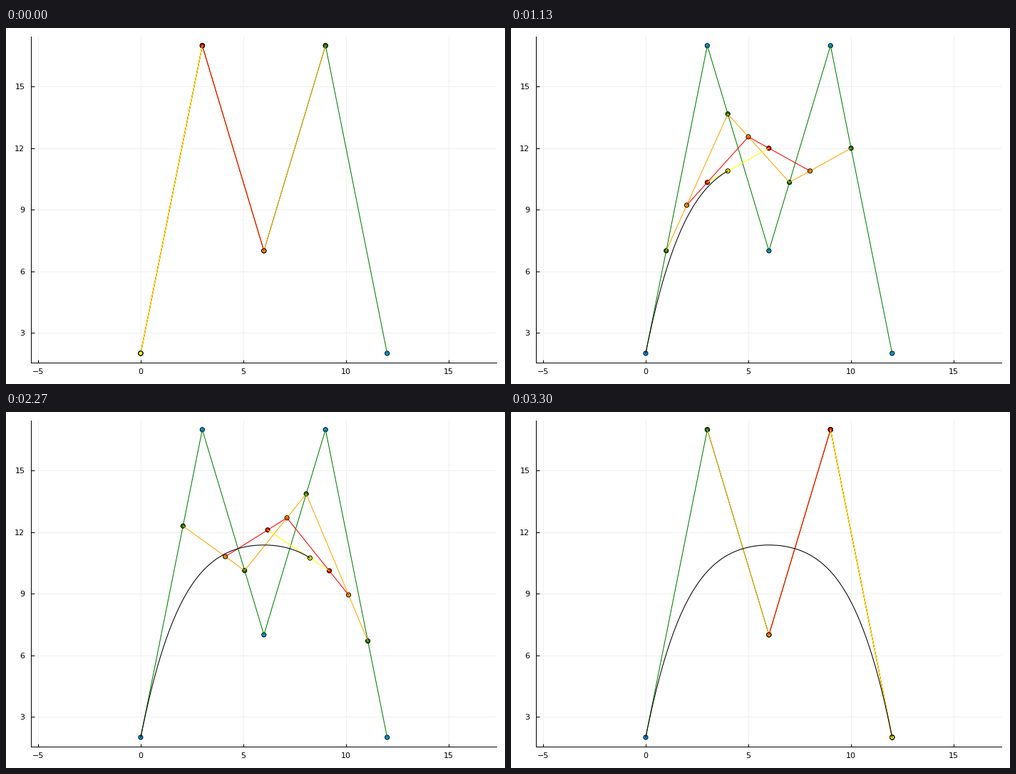
Write a matplotlib script that moves like this. It is 700 px wide and 500 px high and loops after 3.33 s.

```python
import numpy as np
import matplotlib.pyplot as plt
from matplotlib.animation import FuncAnimation
from matplotlib.patches import Circle

W, H, DPI = 700, 500, 100
FRAMES, LOOP = 100, 3330
PX = 72 / DPI  # points per pixel
LEFT, RIGHT, TOP, BOTTOM = 35.4, 688.2, 11.8, 469.9

CONTROL = np.array([(0, 2), (3, 17), (6, 7), (9, 17), (12, 2)], float)
LINE_COLORS = ["green", "orange", "red", "yellow"]
DOT_COLORS = ["#009afa"] + LINE_COLORS

plt.rcParams["font.family"] = "DejaVu Sans"
fig = plt.figure(figsize=(W / DPI, H / DPI), dpi=DPI, facecolor="white")
ax = fig.add_axes([LEFT / W, 1 - BOTTOM / H, (RIGHT - LEFT) / W, (BOTTOM - TOP) / H])

# equal scale on both axes, with a 3 % margin above and below
scale = (BOTTOM - TOP) / 15.9
half = (RIGHT - LEFT) / scale / 2
ax.set_xlim(6 - half, 6 + half)
ax.set_ylim(1.55, 17.45)
ax.set_xticks([-5, 0, 5, 10, 15])
ax.set_yticks([3, 6, 9, 12, 15])
ax.tick_params(direction="in", length=4.5 * PX, width=PX, labelsize=8)
ax.tick_params(axis="x", pad=8 * PX)
ax.tick_params(axis="y", pad=9 * PX)
ax.grid(color="#f0f0f0", linewidth=PX)
ax.set_axisbelow(True)
ax.spines[["top", "right"]].set_visible(False)
for side in ("left", "bottom"):
    ax.spines[side].set_linewidth(PX)


def levels(t):
    """All point rows of de Casteljau's construction at t."""
    rows = [CONTROL]
    while len(rows[-1]) > 1:
        p = rows[-1]
        rows.append(p[:-1] + t * (p[1:] - p[:-1]))
    return rows


def make_line(color, z):
    line, = ax.plot([], [], color=color, lw=1.05 * PX, zorder=z, clip_on=False)
    return line


def make_dot(color, z):
    dot = Circle((0, 0), 3.05 / scale, fc=color, ec="black", lw=PX,
                 zorder=z, clip_on=False)
    return ax.add_patch(dot)


# each row's line runs over its own dots
dots = [[make_dot(c, 3 + 2 * k) for _ in range(5 - k)]
        for k, c in enumerate(DOT_COLORS)]
lines = [make_line(c, 4 + 2 * k) for k, c in enumerate(LINE_COLORS)]
curve = make_line("black", 20)

path = np.array([levels(i / (FRAMES - 1))[-1][0] for i in range(FRAMES)])


def update(i):
    rows = levels(i / (FRAMES - 1))
    for row, group in zip(rows, dots):
        for point, dot in zip(row, group):
            dot.center = tuple(point)
    for row, line in zip(rows, lines):
        line.set_data(row[:, 0], row[:, 1])
    trail = path[:i + 1] if i else path[:0]
    curve.set_data(trail[:, 0], trail[:, 1])
    return []


anim = FuncAnimation(fig, update, frames=FRAMES, interval=LOOP / FRAMES,
                     init_func=lambda: update(0), repeat=True, repeat_delay=0)
plt.show()
```
